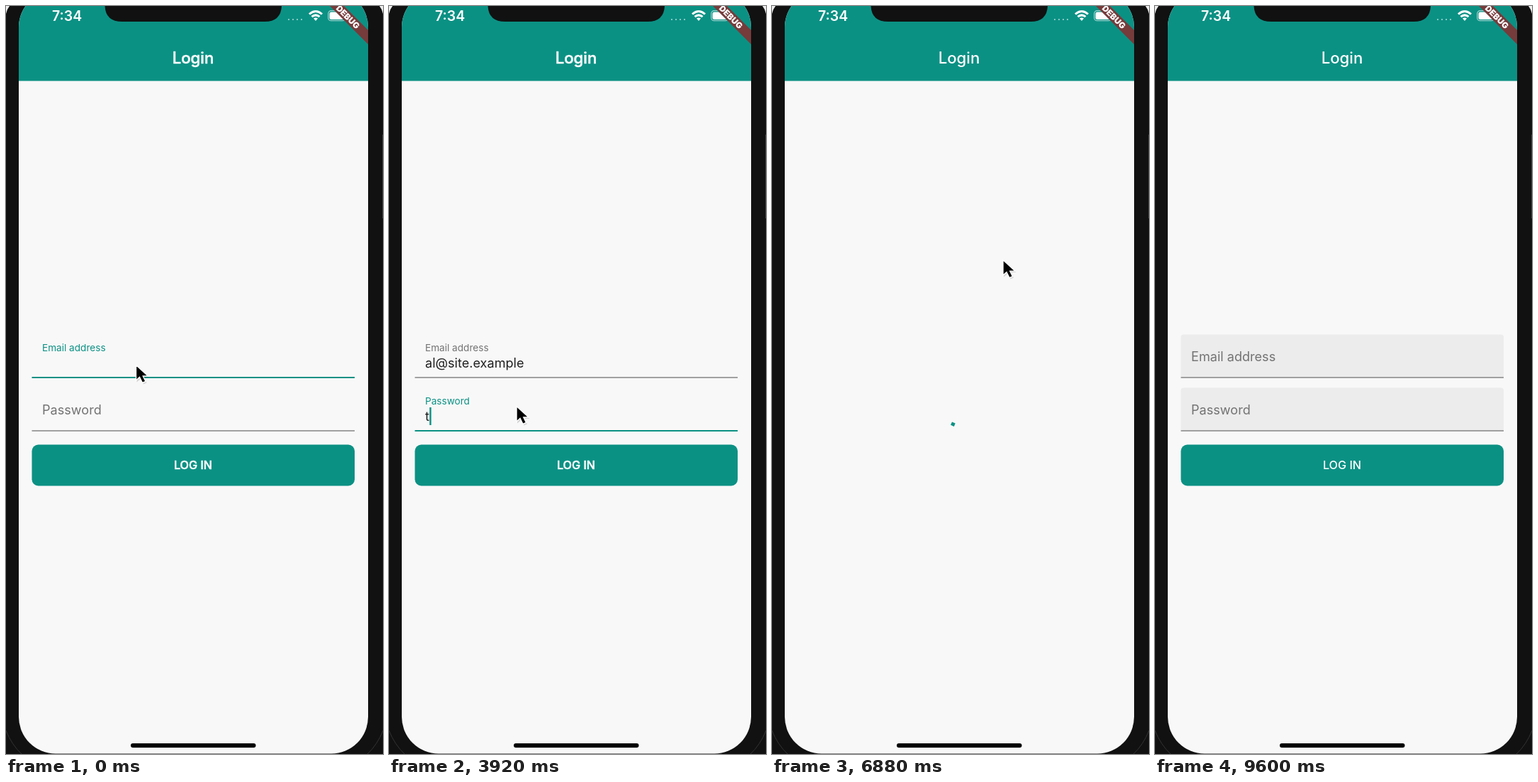
Animation, 532 px wide and 1053 px high, one loop 9680 ms. Source, as an HTML page:

```html
<!DOCTYPE html>
<html lang="en">
<head>
<meta charset="utf-8">
<title>Login flow</title>
<style>
  html, body { margin: 0; width: 100%; height: 100%; overflow: hidden; background: #111; }
  svg { display: block; width: 100vw; height: 100vh; }
  text { font-family: Inter, Roboto, "Liberation Sans", sans-serif; white-space: pre; }
  .mid { text-anchor: middle; }
  .white { fill: #fff; }
  .teal { fill: #0b9184; }
  .input { font-size: 18.1px; fill: #202020; }
  .title { font-size: 22.2px; font-weight: 500; }
  .action { font-size: 16.2px; font-weight: 500; }
  .heavy { stroke: #fff; stroke-width: .5px; }
</style>
</head>
<body>
<svg viewBox="0 0 532 1053">
  <defs>
    <clipPath id="screen"><rect x="18" y="-22" width="493" height="1074.5" rx="52"/></clipPath>
  </defs>
  <rect width="532" height="1053" fill="#111"/>
  <path d="M0 0H5Q1 5 0 11ZM532 0H527Q531 5 532 11Z" fill="#eee"/>
  <path d="M0 1020Q8 1040 22 1053M532 1020Q524 1040 510 1053" fill="none" stroke="#333"/>
  <path d="M531.5 181V299" stroke="#3a3a3a"/>

  <g clip-path="url(#screen)">
    <rect width="532" height="1053" fill="#f8f8f8"/>
    <rect width="532" height="105.5" class="teal"/>
    <text id="title" class="title mid white" x="264" y="81"></text>

    <g id="form">
      <g id="email"></g>
      <g id="password"></g>
      <line id="dots" x1="55" y1="579" y2="579" stroke="#202020" stroke-width="5"
            stroke-linecap="round" stroke-dasharray="0 8.3"/>
      <rect id="caret" width="2.4" height="25" class="teal"/>
      <rect x="36.5" y="617.5" width="455.5" height="58" rx="9" class="teal"/>
      <text id="submit" class="action mid white" x="264" y="652">LOG IN</text>
    </g>

    <path id="spinner" fill="none" stroke="#0b9184" stroke-width="4.8" stroke-linecap="square"/>

    <g id="home">
      <text class="mid" x="264" y="152" font-size="25.6" fill="#202020">Welcome, Lora Vesk</text>
      <g id="press">
        <rect x="211" y="180.5" width="106" height="43.5" rx="3" fill="#d3ebe8"/>
        <circle id="ripple" cx="267" cy="199" fill="#a3dbd4"/>
      </g>
      <text class="action mid teal" x="263.5" y="208">Logout</text>
    </g>

    <text class="white" x="65" y="21" font-size="19.5" font-weight="600">7:34</text>
    <path d="M398 19H420" stroke="#fff" stroke-width="2" stroke-dasharray="2 4" opacity=".5"/>
    <g fill="none" stroke="#fff" stroke-width="3">
      <path d="M428 11.5Q437 3.5 446 11.5M431.5 15.2Q437 10.5 442.5 15.2"/>
      <path d="M434 17.5Q437 15.5 440 17.5L437 21Z" fill="#fff" stroke="none"/>
      <rect x="454.7" y="6.7" width="24" height="14" rx="4" stroke-width="1.2" opacity=".6"/>
      <rect x="456.5" y="8.5" width="20" height="10.5" rx="2.5" fill="#fff" stroke="none"/>
    </g>
    <path d="M457 0H477L511 34V54Z" fill="#763b3b"/>
    <text class="mid white" font-size="11.8" font-weight="900"
          transform="translate(482.5 15.5) rotate(45)" y="4.3">DEBUG</text>
  </g>

  <path d="M139.500-1Q140 22 164 22H365Q388.500 22 389-1Z" fill="#111"/>
  <rect x="176" y="1038" width="176.500" height="6" rx="3" fill="#000"/>
  <g id="pointer">
    <path d="M1 2V24L6.500 19.500 10.500 27 15 25 11.500 17.500H18.500Z" opacity=".14"/>
    <path d="M0 0V21.500L5 17 9 25 13.500 23 9.800 15.500H17Z" stroke="#fff" stroke-width="1.400"/>
  </g>
</svg>

<script>
const LOOP = 9680;
const FOCUS_PASSWORD = 3400, SUBMIT = 5920, WELCOME = 6960, PRESS = 8400, LOGOUT = 8640;
const GREY = '#737373', TEAL = '#0b9184';
const $ = id => document.getElementById(id);
const show = (el, on) => { el.style.display = on ? '' : 'none'; };
const clamp = v => Math.max(0, Math.min(1, v));
const mix = (a, b, p) => a + (b - a) * p;
const set = (el, attrs) => {
  for (const key in attrs) el.setAttribute(key, attrs[key]);
};

const typed = {
  email: {
    text: 'al@site.example',
    times: [400, 560, 720, 880, 1200, 1600, 1840, 2080, 2400, 2480, 2480, 2720, 2720, 2800, 2960]
  },
  password: {
    text: 'testtest123',
    times: [3840, 4080, 4240, 4400, 4720, 4880, 5040, 5200, 5360, 5520, 5760]
  }
};

// time, x, y of the pointer tip
const path = [
  [0, 183.5, 505.5], [3040, 183.5, 505.5], [3360, 180, 563.5], [5760, 180, 563.5],
  [5840, 186, 590], [5920, 190, 640], [6400, 190, 640], [6800, 326, 357.5],
  [6880, 326, 357.5], [6960, 302, 598], [7120, 313, 706], [7360, 313, 706],
  [7920, 318, 392], [8240, 267, 197], [8560, 267, 197], [8720, 275, -40], [LOOP, 275, -40]
];

function makeField(id, label, top) {
  $(id).innerHTML = `
    <path d="M36.5 ${top + 60}V${top + 4}q0-4 4-4h447.5q4 0 4 4v56Z" fill="#ececec"/>
    <line x1="36.5" x2="492" y1="${top + 60.5}" y2="${top + 60.5}"/>
    <text x="51">${label}</text>
    <text class="input" y="${top + 46.5}"></text>`;
  const [fill, line, caption, value] = $(id).children;
  return { fill, line, caption, value, top };
}
const email = makeField('email', 'Email address', 462.5);
const password = makeField('password', 'Password', 537.5);

// cubic-bezier(.4, 0, .2, 1)
function ease(x) {
  let lo = 0, hi = 1, u = .5;
  for (let i = 0; i < 16; i++) {
    u = (lo + hi) / 2;
    const bx = 1.2 * u * (1 - u) ** 2 + .6 * u * u * (1 - u) + u ** 3;
    if (bx < x) lo = u; else hi = u;
  }
  return x <= 0 ? 0 : x >= 1 ? 1 : 3 * u * u * (1 - u) + u ** 3;
}

const countTyped = (field, t) => field.times.filter(at => at <= t).length;

function styleField(f, focused, lift, filled) {
  const colour = focused ? TEAL : GREY;
  show(f.fill, filled);
  set(f.line, { stroke: focused ? TEAL : '#858585', 'stroke-width': focused ? 2.2 : 1.3 });
  set(f.caption, {
    fill: colour,
    'font-size': mix(18.1, 13.6, lift),
    y: f.top + mix(37, 23.8, lift)
  });
}

function drawForm(t) {
  const again = t >= LOGOUT;
  const onPassword = t >= FOCUS_PASSWORD;
  const active = onPassword ? typed.password : typed.email;
  const n = countTyped(active, t);
  const hidden = onPassword && !again ? Math.max(0, n - 1) : 0;

  styleField(email, !again && !onPassword, again ? 0 : 1, again);
  styleField(password, !again && onPassword,
    again ? 0 : ease(clamp((t - FOCUS_PASSWORD) / 200)), again);

  email.value.textContent = again ? '' : typed.email.text.slice(0, countTyped(typed.email, t));
  password.value.textContent = onPassword && !again ? typed.password.text.slice(hidden, n) : '';
  set(email.value, { x: 51 });
  set(password.value, { x: 51 + hidden * 8.3 });
  show($('dots'), hidden > 0);
  set($('dots'), { x2: 55.1 + 8.3 * (hidden - 1) });

  const field = onPassword ? password : email;
  const last = n ? active.times[n - 1] : onPassword ? FOCUS_PASSWORD : -500;
  show($('caret'), !again && (t - last) % 1000 < 500);
  set($('caret'), {
    x: +field.value.getAttribute('x') + field.value.getComputedTextLength() + .3,
    y: field.top + 27.5
  });
}

function drawSpinner(t) {
  const turns = (t - SUBMIT) / 1000, step = Math.floor(turns), p = turns - step;
  const head = ease(clamp(p * 2)), tail = ease(clamp(p * 2 - 1));
  const from = Math.PI * (-.5 + 1.5 * tail + 1.7 * p - .8 * step);
  const sweep = Math.max(1.5 * Math.PI * (head - tail), .001);
  const at = a => `${264 + 21.5 * Math.cos(a)} ${569 + 21.5 * Math.sin(a)}`;
  set($('spinner'), {
    d: `M${at(from)}A21.5 21.5 0 ${sweep > Math.PI ? 1 : 0} 1 ${at(from + sweep)}`
  });
}

function drawPointer(t) {
  const i = path.findIndex(p => p[0] > t);
  const a = path[i - 1], b = path[i];
  const p = ease((t - a[0]) / (b[0] - a[0]));
  set($('pointer'), { transform: `translate(${mix(a[1], b[1], p)} ${mix(a[2], b[2], p)})` });
}

function draw(t) {
  const atHome = t >= WELCOME && t < LOGOUT;
  const loading = t >= SUBMIT && t < WELCOME;
  const early = t < SUBMIT;

  $('title').textContent = atHome ? 'Home Page' : 'Login';
  $('title').classList.toggle('heavy', early);
  $('submit').classList.toggle('heavy', early);
  show($('home'), atHome);
  show($('spinner'), loading);
  show($('form'), !atHome && !loading);
  show($('press'), t >= PRESS);
  set($('ripple'), { r: Math.max(0, mix(10, 18, (t - PRESS) / 80)) });

  if (loading) drawSpinner(t);
  else if (!atHome) drawForm(t);
  drawPointer(t);
}

const start = performance.now();
function tick() {
  draw((performance.now() - start) % LOOP);
  requestAnimationFrame(tick);
}
tick();
</script>
</body>
</html>
```
